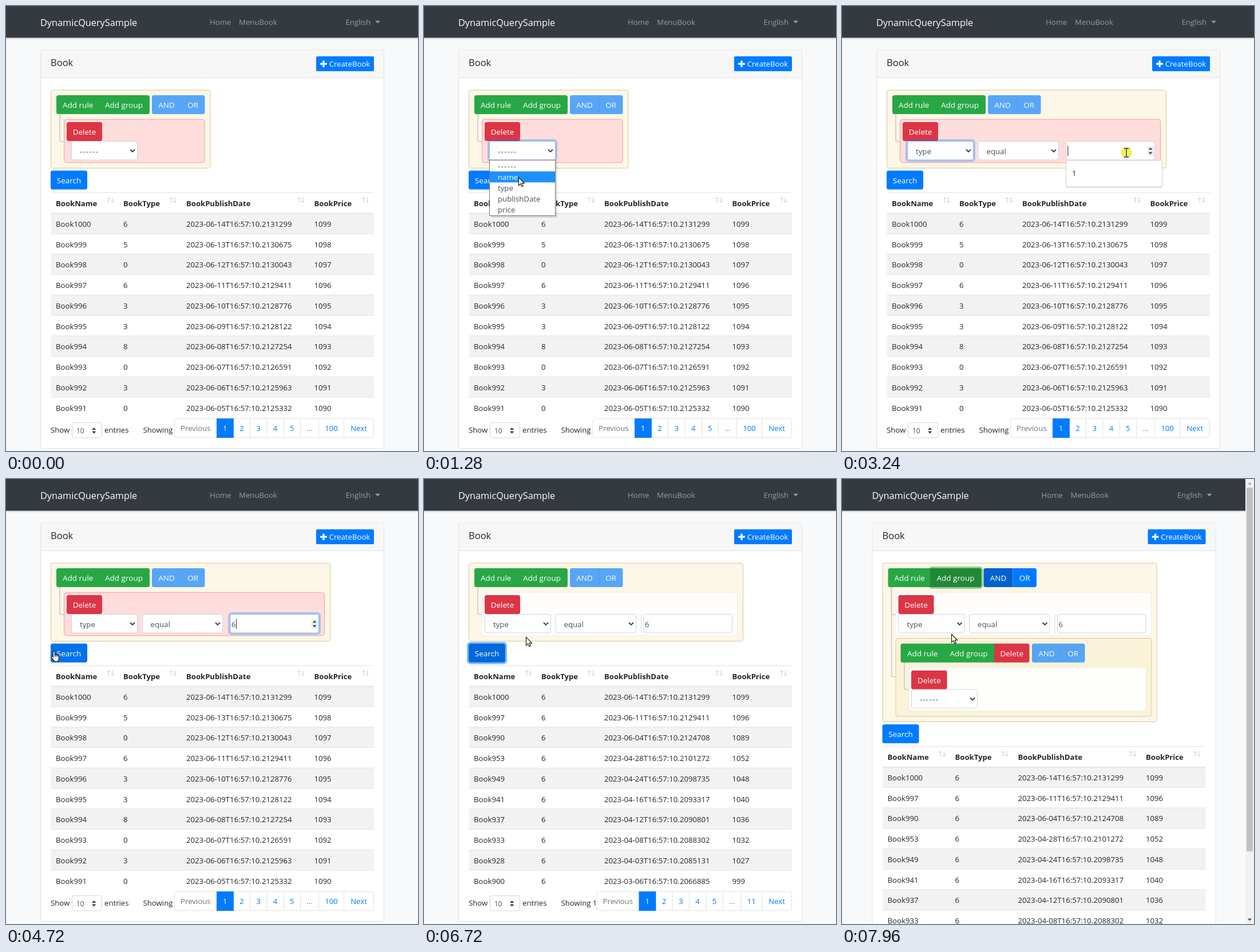
An HTML page for the animation above (8 s loop, 720x778 px).

```html
<!DOCTYPE html>
<html lang="en">
<head>
<meta charset="utf-8">
<title>Query builder</title>
<style>
html, body { margin: 0; width: 100%; height: 100%; overflow: hidden; background: #f8f9fb; }
svg { display: block; width: 100vw; height: 100vh; }
text { font: 13.2px "Open Sans", "Noto Sans", sans-serif; white-space: pre; }
.brand { font-size: 16.3px; }
.title { font-size: 16.5px; font-weight: 500; }
.head { font-weight: 700; font-size: 13.1px; }
.label { font-size: 13.5px; }
.small { font-size: 12px; }
.dash { letter-spacing: 1.3px; }
</style>
</head>
<body>
<svg viewBox="0 0 720 778"><g id="scene"></g><g id="pointer"></g></svg>
<script>
const LOOP = 8000;
const BLUE = '#007bff', GREEN = '#28a745', RED = '#dc3545';
const INK = '#212529', FIELD = '#495057', MUTED = '#9a9da0', LINE = '#dee2e6';
const OPTIONS = ['------', 'name', 'type', 'publishDate', 'price'];

// Moments at which the interface changes
const OPEN = 840, PICK = 1920, SUGGEST = 3160, TYPED = 4240, CLICKED = 4880,
      VALID = 5000, LOADED = 5200, GROWN = 7640;
const CLICKS = [[760, 1000], [1840, 2080], [3080, 3400], [4840, 5040], [7400, 7600]];

// Pointer path: time, x, y
const PATH = [
  [120, 636, 752], [320, 330, 410], [600, 176, 246], [840, 176, 246], [1280, 165, 299],
  [1520, 116, 318], [1960, 116, 318], [2520, 497, 256], [4440, 497, 256], [4680, 84, 301],
  [5040, 84, 301], [5360, 103, 303], [5640, 158, 367], [5880, 205, 390], [6080, 214, 385],
  [6240, 214, 385], [6960, 160, 222], [7040, 180, 184], [7120, 186, 176.5], [7640, 186, 176.5],
  [7960, 191, 271]
];

const ALL = {
  ids: Array.from({ length: 10 }, (_, i) => 1000 - i),
  types: [6, 5, 0, 6, 3, 3, 8, 0, 3, 0],
  ticks: [2131299, 2130675, 2130043, 2129411, 2128776, 2128122, 2127254, 2126591, 2125963, 2125332],
  last: '100', lastW: 44
};
const FOUND = {
  ids: [1000, 997, 990, 953, 949, 941, 937, 933, 928, 900],
  types: Array(10).fill(6),
  ticks: [2131299, 2129411, 2124708, 2101272, 2098735, 2093317, 2090801, 2088302, 2085131, 2066885],
  last: '11', lastW: 36.5
};

const ramp = (t, start, span = 150) => Math.min(1, Math.max(0, (t - start) / span));
const within = (t, a, b) => t >= a && t < b;

function mix(a, b, p) {
  const part = (c, i) => parseInt(c.slice(i, i + 2), 16);
  return `rgb(${[1, 3, 5].map(i => Math.round(part(a, i) + (part(b, i) - part(a, i)) * p))})`;
}

const text = (x, y, s, fill = INK, cls = '', anchor = 'start') =>
  `<text x="${x}" y="${y}" fill="${fill}" class="${cls}" text-anchor="${anchor}">${s}</text>`;

const rect = (x, y, w, h, fill, stroke = 'none', r = 0) =>
  `<rect x="${x}" y="${y}" width="${w}" height="${h}" rx="${r}" fill="${fill}" stroke="${stroke}"/>`;

const path = (d, fill = 'none', stroke = 'none', w = 1) =>
  `<path d="${d}" fill="${fill}" stroke="${stroke}" stroke-width="${w}"/>`;

const shift = (x, y, body) => `<g transform="translate(${x} ${y})">${body}</g>`;

// Box with separate left and right corner radii
const box = (x, y, w, h, fill, l = 3.5, r = 3.5) =>
  path(`M${x + l} ${y}H${x + w - r}q${r} 0 ${r} ${r}V${y + h - r}q0 ${r} ${-r} ${r}` +
       `H${x + l}q${-l} 0 ${-l} ${-l}V${y + l}q0 ${-l} ${l} ${-l}Z`, fill);

const button = (x, y, w, label, fill, l, r) =>
  box(x, y, w, 33, fill, l, r) + text(x + w / 2, y + 22, label, '#fff', 'label', 'middle');

// Focus halo: spread and strength grow together
function ring(x, y, w, h, p, color = BLUE, alpha = .25) {
  const s = 3 * p;
  return p <= 0 ? '' : `<rect x="${x - s / 2}" y="${y - s / 2}" width="${w + s}" height="${h + s}" rx="4.5"
    fill="none" stroke="${color}" stroke-width="${s}" stroke-opacity="${alpha * p}"/>`;
}

function control(x, y, w, focus = 0) {
  return ring(x - .5, y - .5, w + 1, 33.5, focus, BLUE, .32) +
    rect(x, y, w, 32.5, '#fff', mix('#ced4da', '#80bdff', focus), 3.5);
}

function select(x, y, w, value, focus) {
  return control(x, y, w, focus) +
    text(x + 14.5, y + 22, value, FIELD, value === '------' ? 'dash' : '') +
    path(`M${x + w - 12.5} ${y + 14.5}l4 4 4-4`, 'none', '#343a40', 1.8);
}

function logic(x, y, on) {
  const body = button(x, y, 51, 'AND', on ? '#0062cc' : BLUE, 3.5, 0) +
    button(x + 51, y, 41.5, 'OR', BLUE, 0, 3.5) +
    (on ? '' : rect(x + 50.5, y, 1, 33, '#006ee6'));
  return `<g opacity="${on ? 1 : .65}">${body}</g>`;
}

const group = (x, y, w, h) => rect(x, y, w, h, 'rgba(250,240,210,.55)', '#dcc896', 4);
const rule = (x, y, w, bad) =>
  rect(x, y, w, 75.5, bad ? '#fdd' : 'rgba(255,255,255,.9)', bad ? '#f99' : '#eee', 4);
const branch = (x, y, h) => path(`M${x} ${y}v${h - 3}q0 3 3 3h4.5`, 'none', '#ccc', 1.7);

function header(grown) {
  return rect(0, 0, 720, 55.5, '#343a40') +
    rect(0, 55.5, 720, 1.5, 'rgba(0,0,0,.13)') + rect(0, 57, 720, 2, 'rgba(0,0,0,.04)') +
    shift(grown ? -7.5 : 0, 0,
      text(60, 35, 'DynamicQuerySample', '#fff', 'brand') +
      text(356, 33, 'Home', MUTED) + text(407, 33, 'MenuBook', MUTED) +
      text(593.5, 33, 'English', MUTED) + path('M645 25.7h9l-4.5 4.6Z', MUTED));
}

function card(h) {
  return rect(60.5, 77, 600, h, '#fff', '#dfe0e1', 3.5) +
    box(61, 77.5, 599, 47.5, '#f7f7f7', 3, 3) + rect(61, 124.8, 599, 1, '#dfdfdf') +
    text(78, 105, 'Book', INK, 'title') +
    box(542, 88, 101, 26, BLUE, 2.6, 2.6) +
    path('M555 95.5v11.5M549.2 101.2h11.6', 'none', '#fff', 3.2) +
    text(636.3, 106, 'CreateBook', '#fff', '', 'end');
}

function query(t, grown) {
  const picked = t >= PICK, bad = t < VALID;
  const inset = bad ? 8 : 0;
  const ruleW = !picked ? 245.5 : bad ? 455 : 446;
  let s = group(78.5, 147, ruleW + 33, grown ? 277.5 : 136.5);

  s += branch(94, 189, 48) + (grown ? branch(94, 189, 157) : '');
  s += box(88, 156, 163, 33, GREEN);
  const hover = ramp(t, 7030);
  const pressed = within(t, 7400, 7600);
  if (hover) {
    s += ring(162, 156, 89, 33, ramp(t, 7440), GREEN, .5) +
      box(161.5, 156, 89.5, 33, mix(GREEN, pressed ? '#1e7e34' : '#218838', hover), 0, 3.5);
  }
  s += text(99, 178, 'Add rule', '#fff', 'label') + text(173, 178, 'Add group', '#fff', 'label') +
    logic(255, 156, grown);

  s += rule(101.5, 198.3, ruleW, bad);
  const over = ramp(t, 6900) - ramp(t, 7040);
  s += button(106, 203, 62, 'Delete', mix(RED, '#c82333', over));
  const focus = ramp(t, 760) - ramp(t, 3250);
  s += select(106.5 + inset, 236.5, 115, picked ? 'type' : '------', focus);

  if (picked) {
    const typing = ramp(t, 3250) - ramp(t, CLICKED - 40);
    s += select(230 + inset, 236.5, 140.5, 'equal', 0);
    s += rect(379 + inset, 236, 1, 33, '#ddd');
    s += control(384 + inset, 236.5, 154.5, typing);
    if (t >= TYPED) s += text(386 + inset, 259, '6', FIELD);
    if (within(t, 2440, 4920)) {
      s += rect(533, 245, 12.5, 17, '#efefef') +
        path('M535.7 251.2l3.4-4 3.4 4ZM535.7 255.4l3.4 4 3.4-4Z', '#444');
    }
    if (within(t, SUGGEST, 3760)) s += rect(394.3, 244.5, 1, 17.5, '#222');
    if (within(t, TYPED, 4770)) s += rect(402.2, 244.5, 1, 17.5, '#222');
  }
  return s + (grown ? subgroup() : '');
}

function subgroup() {
  return group(101.5, 278.5, 447, 136.5) + branch(116.5, 320.5, 47.5) +
    box(110, 287.7, 164, 33, GREEN, 3.5, 0) +
    text(121.5, 309.5, 'Add rule', '#fff', 'label') + text(196, 309.5, 'Add group', '#fff', 'label') +
    button(273.5, 287.7, 61.5, 'Delete', RED, 0, 3.5) + logic(339.5, 287.7, false) +
    rule(124.5, 330, 414, false) +
    button(128.5, 334.7, 62.5, 'Delete', RED) + select(129, 368, 115, '------', 0);
}

function sortMark(x) {
  return path(`M${x + 2.5} 344v-9M${x} 337.5l2.5-2.7 2.5 2.7M${x + 9} 334.5v9M${x + 6.5} 341l2.5 2.7 2.5-2.7`,
    'none', '#c8c9ca', 1);
}

function table(data) {
  const columns = [[87, 'BookName', 177], [205, 'BookType', 286.5], [315, 'BookPublishDate', 510], [538.5, 'BookPrice', 622.5]];
  let s = rect(78.5, 325.7, 564.5, 1, LINE);
  for (const [x, name, mark] of columns) s += text(x, 349.5, name, INK, 'head') + sortMark(mark);
  data.ids.forEach((id, i) => {
    const y = 362.3 + i * 35.75;
    const day = new Date(Date.UTC(2023, 5, 14 - (1000 - id))).toISOString().slice(0, 10);
    if (i % 2 === 0) s += rect(78.5, y, 564.5, 35.75, '#f2f2f2');
    s += rect(78.5, y - .5, 564.5, i ? 1 : 1.6, LINE);
    s += text(87, y + 23.5, 'Book' + id) + text(205, y + 23.5, data.types[i]) +
      text(315, y + 23.5, `${day}T16:57:10.${data.ticks[i]}`) + text(538.5, y + 23.5, id + 99);
  });
  return s;
}

function footer(data) {
  let s = text(78, 746, 'Show') + rect(115.5, 728.5, 52, 26.5, '#fff', '#ced4da', 3.5) +
    text(123, 747, '10', FIELD, 'small') +
    path('M150 741l3.7-4 3.7 4ZM150 743.5l3.7 4 3.7-4Z', '#343a40') +
    text(172, 746, 'entries') + text(239.5, 746, 'Showing 1');
  const pages = [['Previous', 73.3], ...[1, 2, 3, 4, 5].map(n => [n, 29.3]), ['…', 32], [data.last, data.lastW], ['Next', 52]];
  let x = 642.5 - pages.reduce((sum, p) => sum + p[1], 0);
  s += rect(x, 721.5, 642.5 - x, 33, '#fff', LINE, 3.5);
  for (const [label, w] of pages) {
    const active = label === 1, muted = label === 'Previous' || label === '…';
    if (active) s += rect(x, 721, w + .6, 34, BLUE);
    else if (label !== 'Previous' && label !== 2) s += rect(x - .5, 721.5, 1, 33, LINE);
    s += text(x + w / 2, 743, label, active ? '#fff' : muted ? '#6c757d' : BLUE, '', 'middle');
    x += w;
  }
  return s;
}

function search(t) {
  const dark = ramp(t, 4640) - ramp(t, 7400);
  const focus = ramp(t, CLICKED) - ramp(t, 7370);
  return ring(78, 287.7, 64, 33, focus, BLUE, .5) +
    button(78, 287.7, 64, 'Search', mix(BLUE, '#0069d9', dark));
}

function menu(y) {
  const hot = Math.min(4, Math.max(0, Math.floor((y - 270) / 19.2)));
  let s = rect(117, 272, 116, 98, 'rgba(0,0,0,.13)') + rect(114.5, 269.5, 115, 97, '#fff', '#767676');
  OPTIONS.forEach((name, i) => {
    const top = 270 + i * 19.2;
    if (i === hot) s += rect(115, top, 114, 19.2, '#1e90ff');
    s += text(129, top + 14.5, name, i === hot ? '#fff' : FIELD, i ? '' : 'dash');
  });
  return s;
}

function suggestion() {
  return rect(391, 271, 169, 47, 'rgba(0,0,0,.1)', 'none', 3) +
    rect(391.5, 270, 168, 46, '#fff', '#cfcfcf', 2) + text(402, 297, '1');
}

function scrollbar() {
  return rect(705, 0, 15, 778, '#f1f1f1') + rect(707, 15, 11, 636, '#c1c1c1') +
    path('M709 9.5l3.5-4 3.5 4Z', '#a3a3a3') + path('M709 768.5l3.5 4 3.5-4Z', '#505050');
}

function pointerAt(t) {
  const i = PATH.findIndex(k => k[0] > t);
  if (i < 0) return PATH[PATH.length - 1].slice(1);
  const [a, b] = [PATH[Math.max(0, i - 1)], PATH[i]];
  const p = ramp(t, a[0], Math.max(1, b[0] - a[0]));
  return [a[1] + (b[1] - a[1]) * p, a[2] + (b[2] - a[2]) * p];
}

function pointer(t, x, y) {
  if (t < PATH[0][0]) return '';
  const inside = (l, top, r, b) => x >= l && x <= r && y >= top && y <= b;
  const field = t >= PICK && t < VALID && inside(392, 236, 548, 269);
  const hand = t >= PICK && (inside(78, 288, 142, 321) && t < GROWN ||
    inside(106, 203, 168, 236) || inside(88, 156, 251, 189));
  let s = '';
  if (CLICKS.some(([a, b]) => within(t, a, b))) s += '<circle r="10" fill="#f0e800" opacity=".68"/>';
  if (field) {
    const beam = 'M-4-7h3l1 1 1-1h3M-4 8h3l1-1 1 1h3M0-6V7';
    s += path(beam, 'none', '#fff', 3) + path(beam, 'none', '#222', 1.4);
  } else if (hand) {
    s += path('M-1.6 1.4a1.5 1.5 0 0 1 3 0V7q1.3-1.2 2.6 0q1.4-.9 2.5.4q1.9-.4 1.9 1.6V13' +
      'q0 2-1.3 3.2V18h-7v-1.6L-4.6 11.5q-1.4-2 .2-2.6q1.4-.3 2.8 1.4Z', '#fff', '#111', 1.1) +
      path('M1.4 7v3.5M4 7.5v3M6.5 8v2.5', 'none', '#111', .8);
  } else {
    s += path('M.5.5V14.8l3.3-3.1 2.2 5 2.4-1-2.2-4.9h4.4Z', '#fff', '#111', 1.1);
  }
  return shift(x.toFixed(2), y.toFixed(2), s);
}

function scene(t, y) {
  const grown = t >= GROWN;
  const data = t < LOADED ? ALL : FOUND;
  const lower = search(t) + table(data) + footer(data);
  const page = card(grown ? 838 : 696.5) + query(t, grown) + shift(0, grown ? 141.2 : 0, lower);
  return rect(0, 0, 720, 778, '#f8f9fb') + header(grown) + shift(grown ? -7.5 : 0, 0, page) +
    (within(t, OPEN, PICK) ? menu(y) : '') +
    (within(t, SUGGEST, TYPED) ? suggestion() : '') +
    (grown ? scrollbar() : '');
}

const sceneEl = document.getElementById('scene');
const pointerEl = document.getElementById('pointer');
let shown = '';

function render() {
  const t = performance.now() % LOOP;
  const [x, y] = pointerAt(t);
  const next = scene(t, y);
  if (next !== shown) sceneEl.innerHTML = shown = next;
  pointerEl.innerHTML = pointer(t, x, y);
  requestAnimationFrame(render);
}
render();
</script>
</body>
</html>
```
